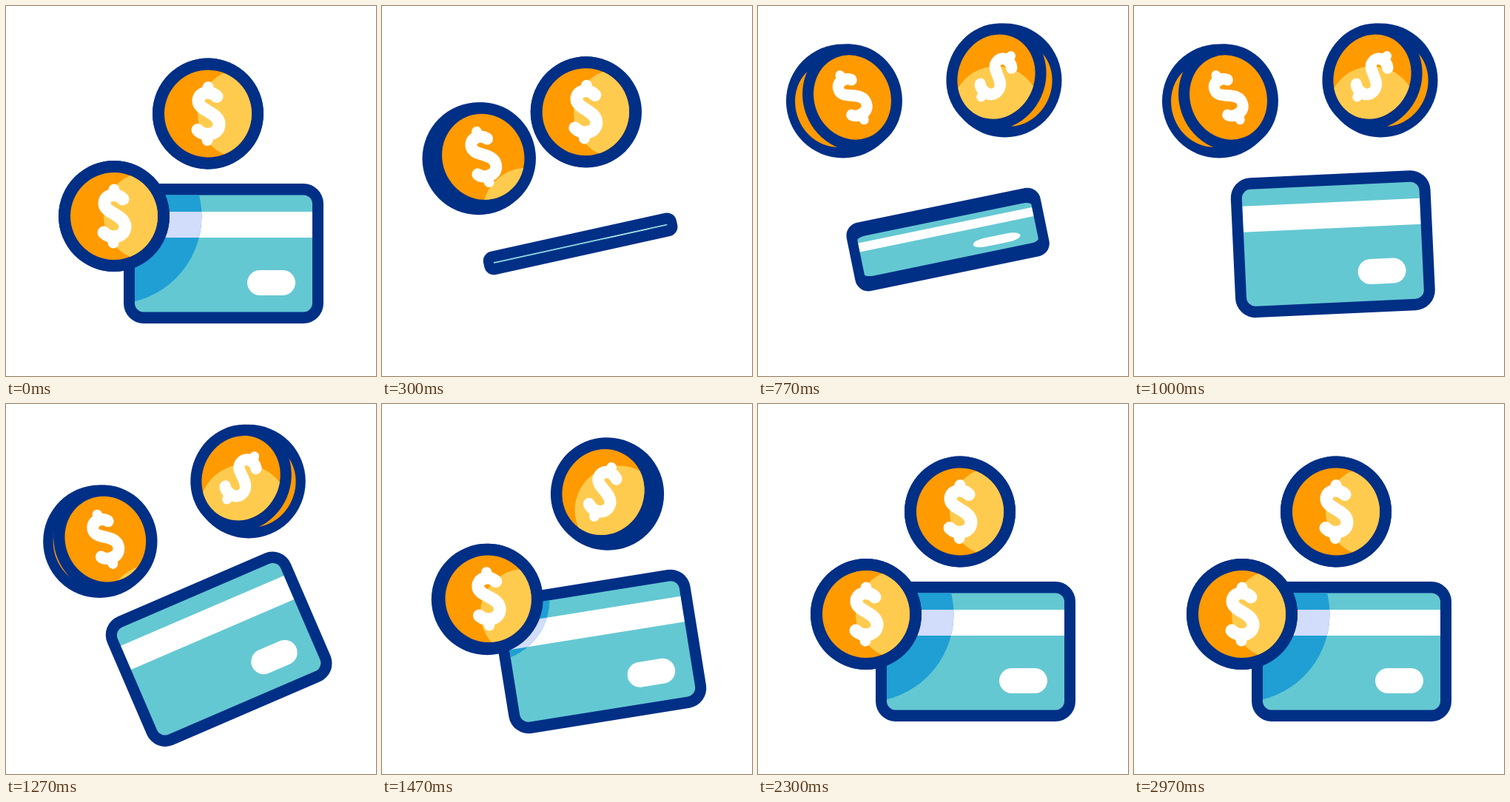
An HTML page with a canvas for the animation above (3010 ms loop, 500x500 px).

```html
<!DOCTYPE html>
<html lang="en">
<head>
<meta charset="utf-8">
<title>Coins and card</title>
<style>
  html, body { margin: 0; width: 100%; height: 100%; overflow: hidden; background: #fff; }
  canvas { display: block; }
</style>
</head>
<body>
<canvas id="stage" width="500" height="500"></canvas>
<script>
const ctx = document.getElementById('stage').getContext('2d');
const LOOP = 3010;
const NAVY = '#002f86', ORANGE = '#ff9a00', GOLD = '#ffcb4f', TEAL = '#64c8d2',
      BLUE = '#1f9fd4', LILAC = '#d2dcfb', WHITE = '#fff';
const FACE = 59, RIM = 16, SHADE = 118.5;

// A coin travels from rest to far; its face shifts, turns and its highlight slides.
const leftCoin = {
  rest: [146, 284], far: [115, 128.5], shift: [12.5, -5],
  turn: -29, glow: [72, 150], beat: [0, 600, 1030, 1600]
};
const topCoin = {
  rest: [273, 145.5], far: [333.5, 100.5], shift: [-11.5, -5],
  turn: 35, glow: [0, 46], beat: [230, 730, 1130, 1830]
};

const dollar = new Path2D('M12-23C4-32-13-30-13-17C-13-4 15-2 15 14C15 30-6 31-14 22');
const stubs = new Path2D('M0-36V-29M-1 29V36');

const rad = deg => deg * Math.PI / 180;
const mix = (a, b, p) => a + (b - a) * p;
const mixPoint = (a, b, p) => [mix(a[0], b[0], p), mix(a[1], b[1], p)];

function ease(t, from, to) {
  const u = Math.min(1, Math.max(0, (t - from) / (to - from)));
  return (1 - Math.cos(Math.PI * u)) / 2;
}

// Rises from 0 to 1, holds, and falls back to 0.
const pulse = (t, up, top, down, end) => ease(t, up, top) - ease(t, down, end);

function ellipse(x, y, rx, ry, color, turn = 0) {
  ctx.beginPath();
  ctx.ellipse(x, y, rx, ry, turn, 0, 2 * Math.PI);
  ctx.fillStyle = color;
  ctx.fill();
}

// Rounded box given by its centre.
function box(x, y, w, h, r, color) {
  ctx.beginPath();
  ctx.roundRect(x - w / 2, y - h / 2, w, h, r);
  ctx.fillStyle = color;
  ctx.fill();
}

function local(draw) {
  ctx.save();
  draw();
  ctx.restore();
}

const coinAt = (coin, p) => mixPoint(coin.rest, coin.far, p);

function drawCoin(coin, t) {
  const p = pulse(t, ...coin.beat);
  const [x, y] = coinAt(coin, p);
  const [dx, dy] = mixPoint([0, 0], coin.shift, p);
  const [lx, ly] = mixPoint([46, 0], coin.glow, p);
  const axis = Math.atan2(coin.shift[1], coin.shift[0]);
  const rx = FACE - 7.5 * p, ry = FACE - p, rim = RIM - p;

  ellipse(x, y, FACE + RIM + 2 * p, FACE + RIM + 2 * p, NAVY);
  ellipse(x - dx, y - dy, rx, ry, ORANGE, axis);

  local(() => {
    ctx.translate(x + dx, y + dy);
    ellipse(0, 0, rx + rim, ry + rim, NAVY, axis);
    ellipse(0, 0, rx, ry, ORANGE, axis);
    local(() => {
      ctx.clip();
      ellipse(lx, ly, 60, 60, GOLD);
    });
    ctx.rotate(rad(coin.turn * p));
    ctx.scale(rx / FACE, (rx + FACE) / (2 * FACE));
    ctx.strokeStyle = WHITE;
    ctx.lineCap = 'round';
    ctx.lineWidth = 17;
    ctx.stroke(dollar);
    ctx.lineWidth = 15;
    ctx.stroke(stubs);
  });
}

function drawFront(x, y, r) {
  box(0, -39, 240, 35, 0, WHITE);
  box(64.5, 39.5, 65, 34, 17, WHITE);
  ellipse(x, y, r, r, BLUE);
  ctx.clip();
  box(0, -39, 240, 35, 0, LILAC);
}

function drawBack() {
  box(-63.7, -27.7, 49, 48, 2, WHITE);
  box(82, -45, 35, 17.5, 8.7, WHITE);
  for (let i = 0; i < 3; i++) box(-79 + 52.7 * i, 58, 35, 17.5, 8.7, WHITE);
}

function drawCard(t) {
  const [x, y] = mixPoint([294, 334.5], [255.5, 315], pulse(t, 0, 490, 680, 1480));
  const angle = rad(-18.5 * pulse(t, 0, 490, 600, 1000) - 23.3 * pulse(t, 930, 1250, 1290, 1600));
  const flip = Math.PI * (ease(t, 0, 600) + ease(t, 440, 1010));
  const cos = Math.cos(flip), flat = Math.abs(cos), edge = 1 - flat * flat;

  // The coin's shade, seen from the turned card.
  const [cx, cy] = coinAt(leftCoin, pulse(t, ...leftCoin.beat));
  const dx = cx - x, dy = cy - y;
  const shadeX = dx * Math.cos(angle) + dy * Math.sin(angle);
  const shadeY = dy * Math.cos(angle) - dx * Math.sin(angle);
  const shadeR = SHADE * (1 - pulse(t, 0, 570, 1300, 1560));

  local(() => {
    ctx.translate(x, y);
    ctx.rotate(angle);
    box(0, 0, 270 - 3 * edge, 189 * flat + 32 * edge, 13 + 14 * flat, NAVY);
    ctx.scale(1, Math.max(flat, 0.012));
    box(0, 0, 240, 158, 12, TEAL);
    ctx.clip();
    if (cos < 0) drawBack();
    else drawFront(shadeX, shadeY, shadeR);
  });
}

function render(now) {
  const t = Math.floor((now % LOOP + 7) * 0.03) / 0.03; // thirty poses a second
  ctx.fillStyle = WHITE;
  ctx.fillRect(0, 0, 500, 500);
  drawCard(t);
  drawCoin(topCoin, t);
  drawCoin(leftCoin, t);
}

const start = performance.now();
function tick() {
  render(performance.now() - start);
  requestAnimationFrame(tick);
}
tick();
</script>
</body>
</html>
```
